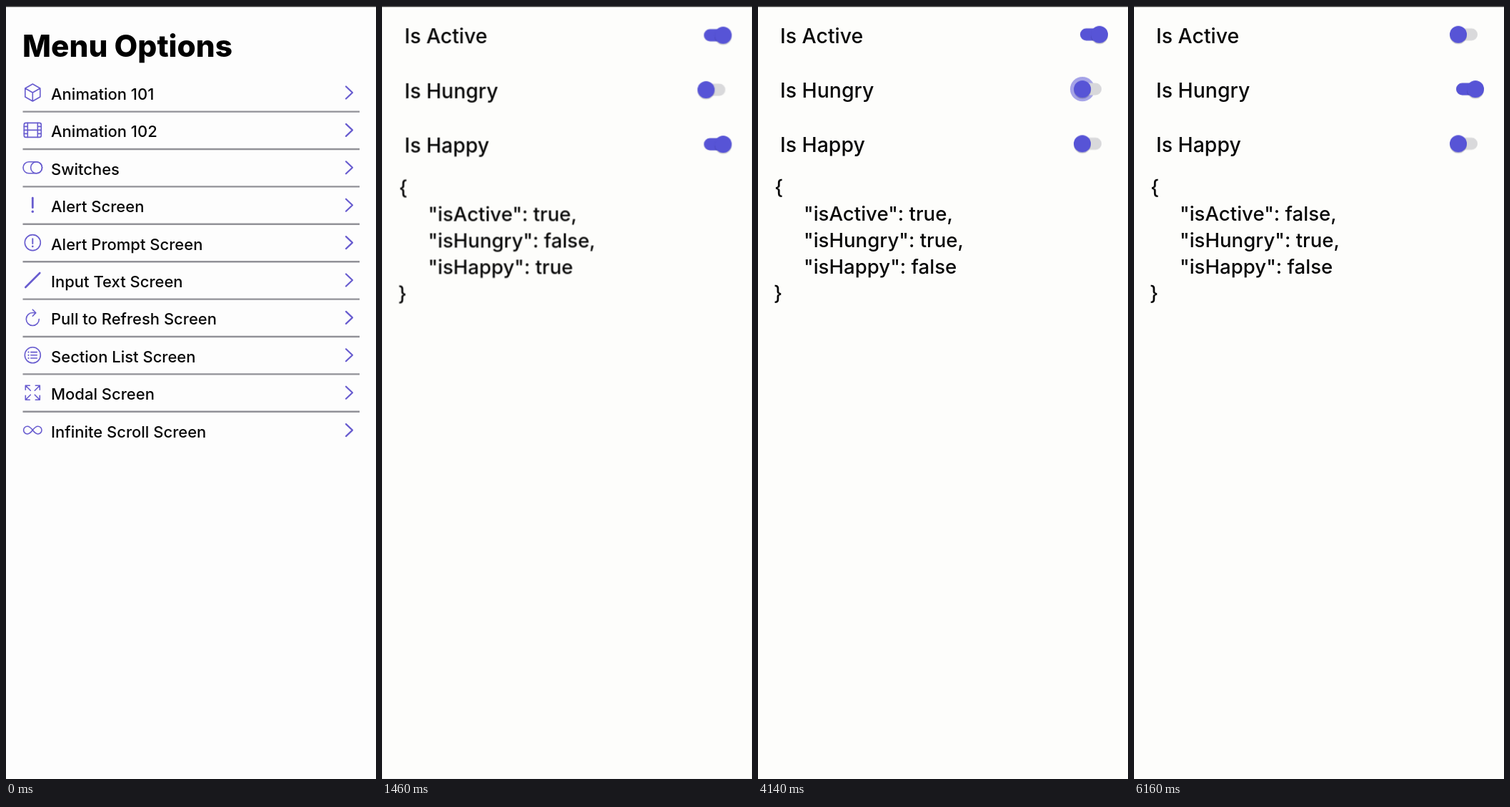
An HTML page for the animation above (6220 ms loop, 518x1080 px).

```html
<!DOCTYPE html>
<html lang="en">
<head>
<meta charset="utf-8">
<title>Menu and switches</title>
<style>
@property --on { syntax: "<number>"; inherits: true; initial-value: 0; }

html, body { margin: 0; width: 100%; height: 100%; overflow: hidden; background: #f2f2f2; }
svg { display: block; width: 100vw; height: 100vh; }
text {
  font-family: Inter, "Open Sans", sans-serif;
  font-weight: 500;
  font-optical-sizing: none;
  fill: #080808;
  white-space: pre;
}
.title { font-size: 42.4px; font-weight: 800; fill: #000; }
.item { font-size: 22px; }
.label { font-size: 28.4px; }
.json { font-size: 27.6px; }
.icon { fill: none; stroke: #685ccf; stroke-width: 1.6; stroke-linecap: round; stroke-linejoin: round; }
.dot { fill: #685ccf; stroke: none; }
.rule { stroke: #929298; stroke-width: 2.4; }
.purple { fill: #5754d6; }

.screen { transform-origin: 259px 540px; }
.menu { animation: leave 6220ms linear infinite; }
.switches { animation: enter 6220ms linear infinite; }
.pressed { animation: press 6220ms linear infinite; }

.row { animation: 6220ms ease-in-out infinite; }
.active { animation-name: active; }
.hungry { animation-name: hungry; }
.happy { animation-name: happy; }
.slide { transform: translateX(calc(var(--on) * 24px)); }
.track { opacity: var(--on); }
.ripple { opacity: 0; animation: ripple 6220ms var(--tap) linear infinite backwards; }

/* The value text swaps as soon as the thumb leaves its start side. */
.row { --moved: calc((var(--on) - var(--start)) * (var(--on) - var(--start)) * 1000000); }
.before { opacity: calc(1 - var(--moved)); }
.after { opacity: var(--moved); }

@keyframes leave {
  0%, 17% { transform: scale(1); opacity: 1; }
  17.04% { transform: scale(1.016); opacity: 1; }
  17.4% { transform: scale(1.023); opacity: 1; }
  18.97% { transform: scale(1.054); opacity: .41; }
  20.25%, 100% { transform: scale(1.077); opacity: 0; }
}
@keyframes enter {
  0%, 20.1% { transform: scale(.9625); opacity: 0; }
  20.9% { transform: scale(.981); opacity: 1; }
  21.7% { transform: scale(.99); opacity: 1; }
  23.47% { transform: scale(.998); opacity: 1; }
  25.24%, 100% { transform: scale(1); opacity: 1; }
}
@keyframes press {
  0%, 12.5% { opacity: 1; }
  12.54%, 14.43% { opacity: .75; }
  14.47%, 17% { opacity: .2; }
  17.04% { opacity: .42; }
  18.97% { opacity: .78; }
  20%, 100% { opacity: 1; }
}
@keyframes active { 0%, 86.17% { --on: 1; } 91.8%, 100% { --on: 0; } }
@keyframes hungry { 0%, 66.24% { --on: 0; } 71.86%, 100% { --on: 1; } }
@keyframes happy { 0%, 42.93% { --on: 1; } 48.55%, 100% { --on: 0; } }
@keyframes ripple {
  0% { transform: scale(.4); opacity: 0; }
  2% { transform: scale(.65); opacity: .5; }
  6% { transform: scale(1); opacity: .66; }
  10.8% { transform: scale(1); opacity: .66; }
  14.9%, 100% { transform: scale(1); opacity: 0; }
}
</style>
</head>
<body>
<svg viewBox="0 0 518 1080" preserveAspectRatio="none">
  <g class="screen menu">
    <rect width="518" height="1080" fill="#fdfdfd"/>
    <text class="title" x="23" y="70.5">Menu Options</text>
    <g id="menu"></g>
  </g>
  <g class="screen switches">
    <rect width="518" height="1080" fill="#fdfdfb"/>
    <g id="switches"></g>
    <text class="json" x="23" y="263">{</text>
    <text class="json" x="22" y="411">}</text>
  </g>
  <rect width="518" height="1.3" fill="#333"/>
</svg>
<script>
const path = (d, width = 1.6) => `<path d="${d}" stroke-width="${width}"/>`;
const circle = (x, y, r, cls = '') => `<circle class="${cls}" cx="${x}" cy="${y}" r="${r}"/>`;
const dot = (x, y, r) => circle(x, y, r, 'dot');
const corner = turn => `<path transform="rotate(${turn})" d="M4-10H10V-4M10-10L3-3"/>`;

const icons = {
  cube: path('M0-12L10.5-6V6L0 12L-10.5 6V-6ZM-10.5-6L0 0L10.5-6M0 0V12'),
  film: '<rect x="-12" y="-10" width="24" height="20" rx="2.5"/>' +
    path('M-7-10V10M7-10V10M-7 0H7M-12-5H-7M-12 0H-7M-12 5H-7M12-5H7M12 0H7M12 5H7'),
  toggle: '<rect x="-13.3" y="-8" width="26.6" height="16" rx="8"/>' + circle(5.3, 0, 8),
  alert: path('M0-10V3.5', 2.8) + dot(0, 9, 1.7),
  alertCircle: circle(0, 0, 11) + path('M0-5.5V1.5', 1.9) + dot(0, 5.3, 1.3),
  pencil: path('M-10 10L10-10', 2.6),
  refresh: path('M3.6-6.2Q4-6.9 0-6.9A9 9 0 1 0 9 2.1M0-11.2L4.5-6.7L0-2.2'),
  list: circle(0, 0, 11) + path('M-2.5-4.2H6M-2.5 0H6M-2.5 4.2H6') +
    [-4.2, 0, 4.2].map(y => dot(-5.8, y, 1.1)).join(''),
  expand: [0, 90, 180, 270].map(corner).join(''),
  infinite: path('M0 0C-3-4-5-5.4-7.3-5.4A5.4 5.4 0 0 0-7.3 5.4C-5 5.4-3 4 0 0' +
    'C3-4 5-5.4 7.3-5.4A5.4 5.4 0 0 1 7.3 5.4C5 5.4 3 4 0 0')
};

const items = [
  ['cube', 'Animation 101'],
  ['film', 'Animation 102'],
  ['toggle', 'Switches'],
  ['alert', 'Alert Screen'],
  ['alertCircle', 'Alert Prompt Screen'],
  ['pencil', 'Input Text Screen'],
  ['refresh', 'Pull to Refresh Screen'],
  ['list', 'Section List Screen'],
  ['expand', 'Modal Screen'],
  ['infinite', 'Infinite Scroll Screen']
];

const menuRow = ([icon, name], i) => `
  <g transform="translate(0 ${121 + i * 52.4})">
    <g class="${name === 'Switches' ? 'pressed' : ''}">
      <g class="icon" transform="translate(37.3 0)">${icons[icon]}</g>
      <text class="item" x="63" y="10">${name}</text>
      <path class="icon" d="M476-8.5L485 0L476 8.5" style="stroke-width:2.2"/>
    </g>
    ${i < items.length - 1 ? '<path class="rule" d="M23.5 26.6H495"/>' : ''}
  </g>`;

// Name, starting state and tap time in ms.
const switches = [
  ['Active', true, 5210],
  ['Hungry', false, 3970],
  ['Happy', true, 2520]
];

const switchRow = ([name, start, tap], i) => {
  const end = i < switches.length - 1 ? ',' : '';
  const json = (cls, value) =>
    `<text class="json ${cls}" x="64" y="${300 + i * 37}">"is${name}": ${value}${end}</text>`;
  const track = 'x="-3" y="-8.5" width="30" height="17" rx="8.5"';
  const y = 39.8 + i * 76.3;
  return `
  <g class="row ${name.toLowerCase()}" style="--start:${+start};--tap:${tap}ms">
    <text class="label" x="31" y="${y + 11.7}">Is ${name}</text>
    <g transform="translate(454 ${y})">
      <g class="slide">${circle(0, 0, 24, 'ripple purple')}</g>
      <rect ${track} fill="#d9d9db"/>
      <rect ${track} class="track purple"/>
      <g class="slide">
        <circle cy="1.6" r="12" opacity=".18"/>
        ${circle(0, 0, 12, 'purple')}
      </g>
    </g>
    ${json('before', start)}${json('after', !start)}
  </g>`;
};

document.getElementById('menu').innerHTML = items.map(menuRow).join('');
document.getElementById('switches').innerHTML = switches.map(switchRow).join('');
</script>
</body>
</html>
```
